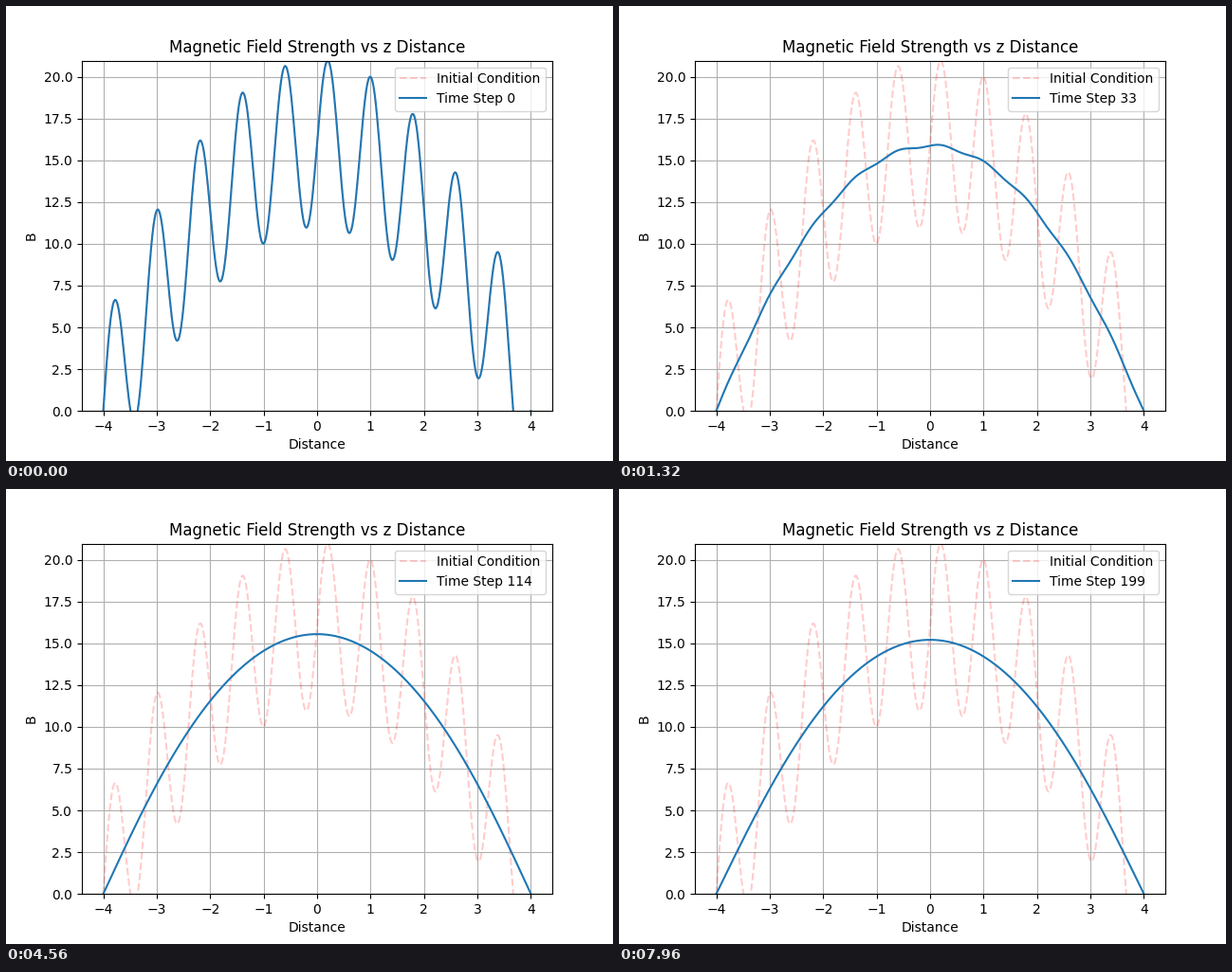
Write a matplotlib script that moves like this. It is 640x480 px and loops after 8000 ms.

```python
import matplotlib.pyplot as plt
import numpy as np
from matplotlib.animation import FuncAnimation

STEPS = 200
INTERVAL = 40
HALF = 4.0          # field vanishes at z = -HALF and z = HALF
DIFFUSION = 0.002   # diffusivity times one time step
CELLS = 400

z = np.linspace(-HALF, HALF, CELLS + 1)
start = 16 - z**2 + 5 * np.sin(2.5 * np.pi * z)

# Diffusion solved exactly in a sine basis with fixed zero ends
modes = np.arange(1, CELLS)
wave = modes * np.pi / (2 * HALF)
basis = np.sin(np.outer(z + HALF, wave))
coeffs = 2 / CELLS * basis.T @ start


def field(step):
    if step == 0:
        return start
    return basis @ (coeffs * np.exp(-DIFFUSION * step * wave**2))


fig, ax = plt.subplots(figsize=(6.4, 4.8), dpi=100)
ax.plot(z, start, "r--", alpha=0.2, label="Initial Condition")
line, = ax.plot(z, start, color="tab:blue", label="Time Step 0")
ax.set_ylim(0, start.max())
ax.set_title("Magnetic Field Strength vs z Distance")
ax.set_xlabel("Distance")
ax.set_ylabel("B")
ax.grid(True)
legend = ax.legend(loc="upper right")
step_label = legend.get_texts()[1]


def update(step):
    line.set_ydata(field(step))
    step_label.set_text(f"Time Step {step}")
    return line, step_label


anim = FuncAnimation(fig, update, frames=STEPS, interval=INTERVAL,
                     repeat=True, repeat_delay=0)
plt.show()
```
